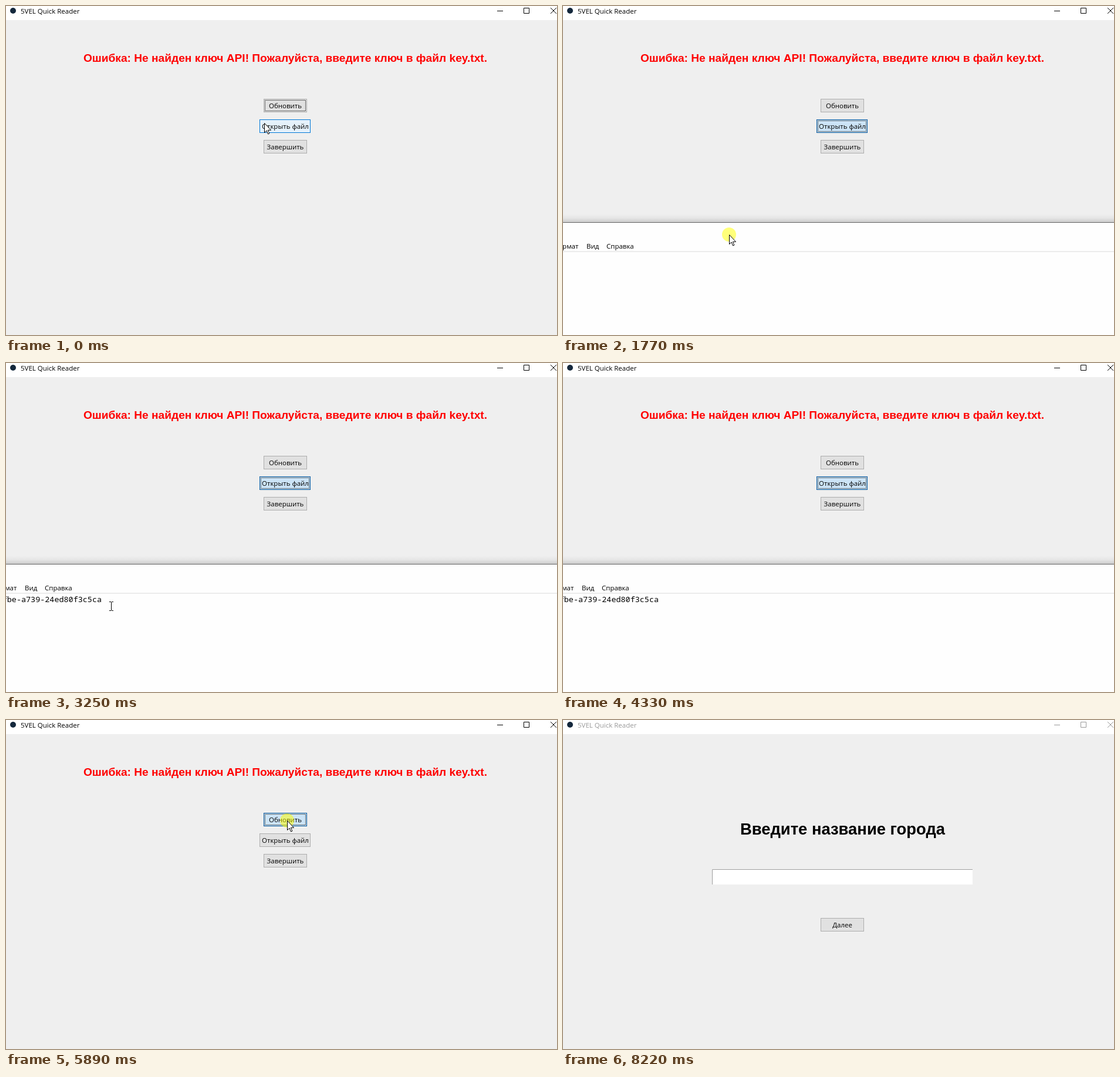
An HTML page that plays this animation: 939x560 px, repeating every 8290 ms.

```html
<!DOCTYPE html>
<html lang="ru">
<head>
<meta charset="utf-8">
<style>
  html, body { margin: 0; width: 100%; height: 100%; overflow: hidden; background: #efefef; }
  svg { display: block; width: 939px; height: 560px; }
  text { font: 11.5px "Open Sans", "Noto Sans", sans-serif; white-space: pre; }
  .head { font: bold 19.15px "Liberation Sans", sans-serif; fill: #f00; }
  .big { font-size: 27.4px; fill: #000; }
  .key { font: 13.44px "Noto Sans Mono", monospace; }
  .mid { text-anchor: middle; }
  .end { text-anchor: end; }
  .button rect { fill: #e1e1e1; stroke: #adadad; shape-rendering: crispEdges; }
  .button.hover rect { fill: #e5f1fb; stroke: #0078d7; }
  .button.press rect { fill: #cce4f7; stroke: #005499; }
  .button .ring { display: none; fill: none !important; stroke: #000 !important; stroke-dasharray: 1; stroke-dashoffset: .5; }
  .button.focus .ring { display: inline; }
</style>
</head>
<body>
<svg viewBox="0 0 939 560">
  <defs>
    <linearGradient id="shade" x1="0" y1="0" x2="0" y2="1">
      <stop offset="0" stop-opacity="0"/>
      <stop offset=".5" stop-opacity=".04"/>
      <stop offset="1" stop-opacity=".15"/>
    </linearGradient>
  </defs>
  <rect width="939" height="560" fill="#efefef"/>
  <rect width="939" height="24" fill="#fff"/>
  <circle cx="12" cy="8" r="5" fill="#14283c"/>
  <g id="bar">
    <text x="25" y="13">5VEL Quick Reader</text>
    <path d="M837 8.5h10M882.5 3.5h9v9h-9zM928 3l10 10M938 3l-10 10" fill="none" stroke="currentColor"/>
  </g>

  <g id="errorPage">
    <text class="head mid" x="476" y="95">Ошибка: Не найден ключ API! Пожалуйста, введите ключ в файл key.txt.</text>
    <g id="refresh"></g>
    <g id="open"></g>
    <g id="quit"></g>
  </g>

  <g id="cityPage">
    <text class="head big mid" x="476.5" y="195">Введите название города</text>
    <rect x="254" y="254" width="444" height="26" fill="#fff"/>
    <path d="M254.5 280V254.5H698" fill="none" stroke="#a0a0a0"/>
    <g id="next"></g>
  </g>

  <!-- editor; its origin is the top edge, at the left of the last menu word -->
  <g id="editor">
    <rect x="-400" y="-14" width="1500" height="14" fill="url(#shade)"/>
    <rect x="-400" width="1500" height="600" fill="#fefefe"/>
    <rect x="-400" width="1500" height="1" fill="#666"/>
    <rect x="-400" y="49" width="1500" height="2" fill="#ececec"/>
    <text class="end" x="-90" y="20">Блокнот</text>
    <text class="end" x="-105" y="45">Правка</text>
    <text x="-91" y="45">Формат</text>
    <text x="-34" y="45">Вид</text>
    <text y="45">Справка</text>
    <text id="key" class="key end" x="97" y="65">6fbe-a739-24ed80f3c5ca</text>
    <rect id="caret" x="97" y="52" width="1" height="17"/>
  </g>

  <g id="mouse">
    <circle id="glow" r="12" fill="#ff0" fill-opacity=".52"/>
    <path id="arrow" d="M.5.5V16.5L4 13l2.6 6 2.3-1-2.6-5.7H11.5z" fill="#fff" stroke="#000"/>
    <path id="beam" d="M-3 -7.5h3m1 0h3M.5 -7V7M-3 7.5h3m1 0h3" fill="none" stroke="#000"/>
  </g>
</svg>
<script>
const LOOP = 8290, STEP = 68, BLINK = 530;
const $ = id => document.getElementById(id);
const show = (id, on) => $(id).style.display = on ? '' : 'none';

const easeIn = p => f => f ** p;
const easeOut = p => f => 1 - (1 - f) ** p;
const smooth = f => f * f * (3 - 2 * f);

// Mouse strokes, each lasting a number of screen updates
const stroke = (start, steps, from, to, ease) => ({ start, steps, from, to, ease });
const refreshSpot = [479, 171], citySpot = [389, 271], pasteSpot = [179, 414], dropSpot = [275, 364];
const strokes = [
  stroke(0, 1, [440, 199], [440, 199], smooth),
  stroke(342, 3, [440, 199], [354, 414], easeIn(1.5)),
  stroke(1350, 10, [327, 523], dropSpot, easeOut(2)),
  stroke(2180, 5, dropSpot, pasteSpot, smooth),
  stroke(3250, 14, pasteSpot, [883, 378], easeIn(4.7)),
  stroke(4860, 12, [513, 393], refreshSpot, easeOut(2.3)),
  stroke(5900, 11, refreshSpot, citySpot, smooth),
  stroke(6852, 14, citySpot, [860, 558], smooth)
];

function mouseAt(t) {
  const { start, steps, from, to, ease } = strokes.findLast(s => s.start <= t);
  const f = ease(Math.min(1, Math.floor((t - start) / STEP) / steps));
  return from.map((a, k) => Math.round(a + (to[k] - a) * f));
}

function makeButton(id, label, y, w = 74) {
  const x = Math.floor(476 - w / 2);
  $(id).innerHTML = `<rect x="${x + .5}" y="${y + .5}" width="${w - 1}" height="22"/>
    <rect class="ring" x="${x + 2.5}" y="${y + 2.5}" width="${w - 5}" height="18"/>
    <text class="mid" x="476" y="${y + 16}">${label}</text>`;
  setButton(id, '');
}
const setButton = (id, state, focus) =>
  $(id).setAttribute('class', `button ${state} ${focus ? 'focus' : ''}`);

makeButton('refresh', 'Обновить', 158);
makeButton('open', 'Открыть файл', 193, 87);
makeButton('quit', 'Завершить', 228);
makeButton('next', 'Далее', 337);

function draw(t) {
  const within = (a, b) => t >= a && t < b;
  const [x, y] = mouseAt(t);
  const city = t >= 5900, editing = within(1350, 4860), dragging = within(1350, 2180);

  const ink = t >= 8220 ? '#999' : '#000';
  $('bar').style.color = $('bar').style.fill = ink;
  show('errorPage', !city);
  show('cityPage', city);

  const over = (top, bottom) => x > 432 && x < 519 && y >= top && y <= bottom ? 'hover' : '';
  const pressing = t >= 5830;
  setButton('refresh', pressing ? 'press' : over(158, 181), t < 70 || pressing);
  setButton('open', within(70, 4860) ? 'press' : over(193, 216), t >= 70 && !pressing);

  // The dragged window keeps its offset from the mouse
  const [ex, ey] = dragging ? [x, y] : dropSpot;
  show('editor', editing);
  $('editor').setAttribute('transform', `translate(${ex - 209} ${Math.round(342 + (ey - 364) * 1.023)})`);
  show('key', t >= 2720);
  show('caret', within(2720, 4330) && Math.floor((t - 2720) / BLINK) % 2 === 0);

  show('mouse', !(within(620, 1350) || within(4330, 4860) || t >= 7890));
  $('mouse').setAttribute('transform', `translate(${x} ${y})`);
  show('glow', within(70, 140) || dragging || within(5830, 5900));
  const beam = editing && !dragging && y > 393 ||
    city && x > 254 && x < 698 && y >= 254 && y < 280;
  show('beam', beam);
  show('arrow', !beam);
}

const begin = performance.now();
function tick() {
  draw((performance.now() - begin) % LOOP);
  requestAnimationFrame(tick);
}
tick();
</script>
</body>
</html>
```
